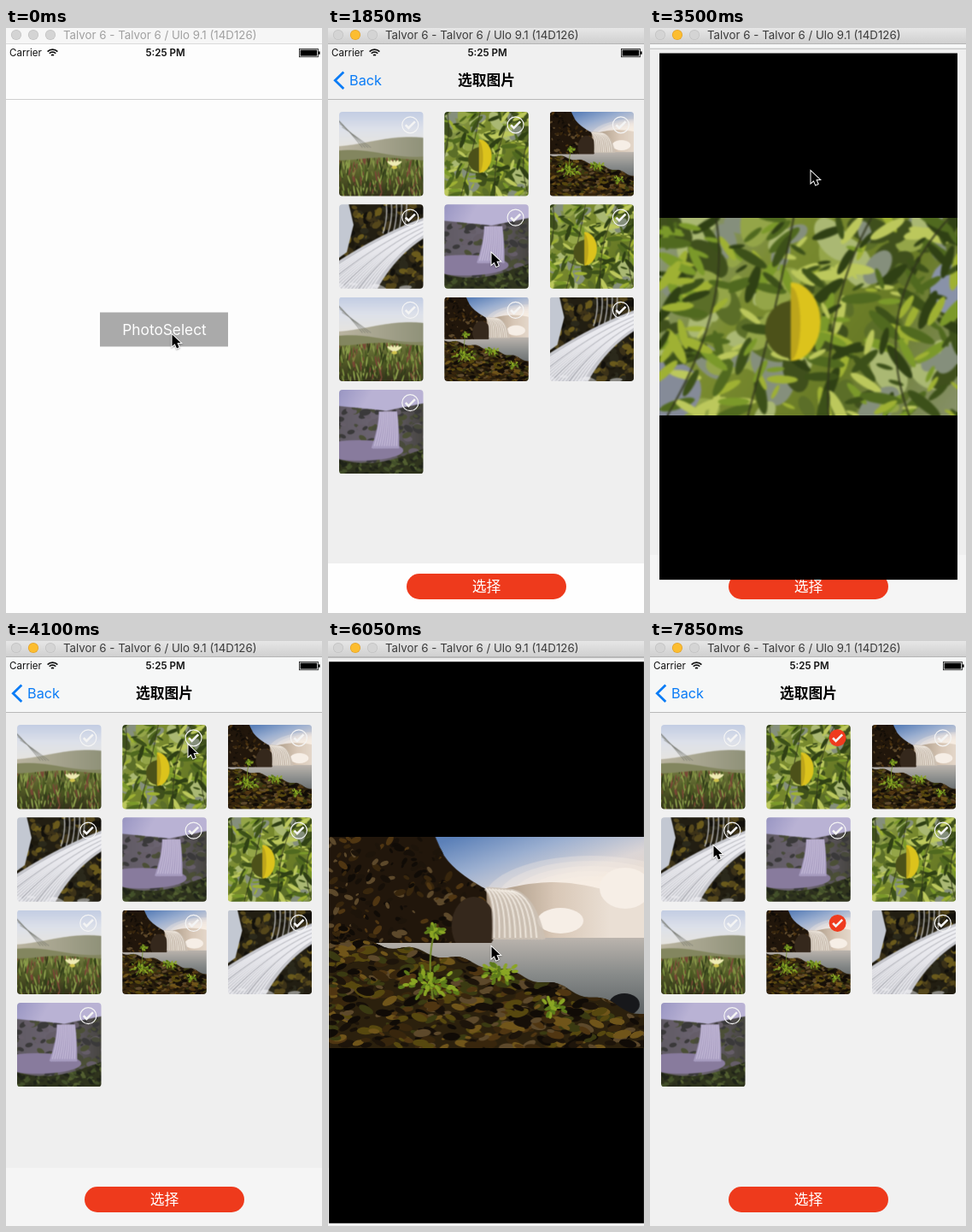
Write an HTML page with a canvas that moves like this. It is 370x684 px and loops after 8000 ms.

```html
<!DOCTYPE html>
<html lang="zh-Hans">
<head>
<meta charset="utf-8">
<title>Photo picker</title>
<style>
html, body { margin: 0; width: 100%; height: 100%; overflow: hidden; background: #fdfdfd; }
canvas { display: block; width: 370px; height: 684px; }
</style>
</head>
<body>
<canvas id="stage" width="370" height="684"></canvas>
<script>
const W = 370, H = 684, LOOP = 8000, STEP = 150, PW = 370, PH = 247, CELL = 98.5;
const ctx = document.getElementById('stage').getContext('2d');
ctx.imageSmoothingQuality = 'high';
const LATIN = 'Inter, "Liberation Sans", sans-serif';
const CJK = '"Noto Sans CJK SC", "Noto Sans CJK", sans-serif';

// ---------- helpers ----------
const clamp = v => Math.min(1, Math.max(0, v));
const mix = (a, b, p) => a + (b - a) * p;
const ease = v => { const u = clamp(v); return u * u * (3 - 2 * u); };
const easeOut = v => 1 - (1 - clamp(v)) ** 3;

function rng(seed) {
  return () => (seed = (seed * 16807) % 2147483647) / 2147483647;
}

function trace(g, pts) {
  g.beginPath();
  for (let i = 0; i < pts.length; i += 2) g.lineTo(pts[i], pts[i + 1]);
}

function oval(g, color, x, y, rx, ry, turn = 0, from = 0, to = 7) {
  g.fillStyle = color;
  g.beginPath();
  g.ellipse(x, y, rx, ry, turn, from, to);
  g.fill();
}

function fade(g, x0, y0, x1, y1, ...colors) {
  const f = g.createLinearGradient(x0, y0, x1, y1);
  colors.forEach((c, i) => f.addColorStop(i / (colors.length - 1), c));
  return f;
}

function text(str, x, y, font, color, align = 'left') {
  ctx.font = font;
  ctx.fillStyle = color;
  ctx.textAlign = align;
  ctx.fillText(str, x, y);
}

function box(color, x, y, w, h) {
  ctx.fillStyle = color;
  ctx.fillRect(x, y, w, h);
}

function pill(color, x, y, w, h, r) {
  ctx.fillStyle = color;
  ctx.beginPath();
  ctx.roundRect(x, y, w, h, r);
  ctx.fill();
}

// ---------- pictures ----------
function picture(seed, blur, paint) {
  const [sharp, soft] = [0, 1].map(() => {
    const c = document.createElement('canvas');
    c.width = PW;
    c.height = PH;
    return c;
  });
  paint(sharp.getContext('2d'), rng(seed));
  const g = soft.getContext('2d');
  g.drawImage(sharp, 0, 0);
  g.filter = `blur(${blur}px)`;
  g.drawImage(sharp, 0, 0);
  return soft;
}

function backdrop(g, fill) {
  g.fillStyle = fill;
  g.fillRect(0, 0, PW, PH);
}

// Fills everything below a skyline and leaves it as the clip for its texture.
function land(g, fill, skyline, texture) {
  g.save();
  g.beginPath();
  g.moveTo(0, PH);
  for (let x = 0; x <= PW; x += 5) g.lineTo(x, skyline(x));
  g.lineTo(PW, PH);
  g.fillStyle = fill;
  g.fill();
  g.clip();
  if (texture) texture();
  g.restore();
}

function specks(g, rnd, n, top, colors, rx, ry, turn) {
  for (let i = 0; i < n; i++) {
    const s = 0.4 + rnd();
    oval(g, colors[i % colors.length], rnd() * PW, mix(top, PH, rnd()), rx * s, ry * s, (rnd() - 0.5) * turn);
  }
}

function tuft(g, rnd, x, y, r, n) {
  for (let i = 0; i < n; i++) {
    const a = rnd() * 7, d = r * rnd();
    oval(g, i % 2 ? '#8aa524' : '#5c7a1a', x + d * Math.cos(a), y + d * 0.6 * Math.sin(a), 4, 2, a);
  }
}

function strands(g, n, color, width, curve) {
  g.strokeStyle = color;
  g.lineWidth = width;
  for (let i = 0; i < n; i++) {
    const [x0, y0, cx, cy, x1, y1] = curve(i / (n - 1));
    g.beginPath();
    g.moveTo(x0, y0);
    g.quadraticCurveTo(cx, cy, x1, y1);
    g.stroke();
  }
}

const meadow = picture(11, 0.8, (g, rnd) => {
  backdrop(g, fade(g, 0, 0, 0, 100, '#c3cde3', '#dde1ea', '#e6e4e0'));
  land(g, fade(g, 0, 0, PW, 0, '#c4bca9', '#a5a38d', '#85896f'), x => 88 - 14 * Math.sin(x / 75 - 2));
  land(g, '#83865f', x => 122 - 10 * Math.sin(x / 60));
  land(g, fade(g, 0, 130, 0, PH, '#747a40', '#525a26', '#33301a'), x => 138 + 4 * Math.sin(x / 40),
    () => specks(g, rnd, 420, 130, ['#7f9440', '#46561f', '#7a4636', '#303c18', '#8fa24d'], 1.8, 12, 0.7));
  strands(g, 4, '#70726a', 1.3, u => [50 + u * 20, 15 + u * 30, 95, 60, 130 + u * 25, 105]);
  for (let i = -2; i <= 2; i++) oval(g, '#efecb4', 224 + i * 5, 154 - Math.abs(i), 4, 13, i * 0.5);
  oval(g, '#d2c44e', 224, 163, 8, 5);
});

const foliage = picture(29, 0.9, (g, rnd) => {
  backdrop(g, fade(g, 0, 0, PW, PH, '#8b9683', '#7b8c30', '#687a26', '#87916a'));
  specks(g, rnd, 90, 0, ['#5b6e28', '#94a548', '#aab873', '#3f4f1c', '#858f7c'], 26, 15, 3);
  oval(g, '#858b98', 12, 215, 40, 36);
  oval(g, '#8992a8', 358, 88, 22, 32);
  specks(g, rnd, 230, 0, ['#9fb133', '#50691f', '#bcc85c', '#2f4014', '#7b992a', '#3c5019'], 19, 5, 2.8);
  strands(g, 4, '#30351b', 2, u => [70 + u * 290, 0, 90 + u * 170, 110, 10 + u * 300, PH]);
  oval(g, '#4c5119', 165, 140, 34, 36, 0, Math.PI / 2, Math.PI * 1.5);
  oval(g, '#dcc31c', 163, 130, 37, 49, 0, -Math.PI / 2, Math.PI / 2);
  oval(g, '#bda51b', 163, 132, 12, 46, 0, -Math.PI / 2, Math.PI / 2);
});

const river = picture(43, 0.7, (g, rnd) => {
  backdrop(g, fade(g, 150, 0, 190, 120, '#5b80b8', '#9bafd0', '#dcd6d6', '#e6d5c6'));
  for (let i = 0; i < 6; i++) oval(g, 'rgba(248,238,228,.3)', 308, 72, 125 - i * 15, 50 - i * 6);
  land(g, fade(g, 200, 0, 330, 0, '#aa9884', '#d8c7b6', '#eadfd4'), x => 62 - 9 * Math.sin((x - 200) / 40));
  oval(g, '#f6eee6', 348, 60, 30, 24);
  oval(g, '#f6eee6', 272, 98, 27, 15);
  land(g, fade(g, 0, 116, 0, 205, '#bdb6af', '#888b8a', '#5f6466'), () => 118);
  const rocks = ['#100b06', '#38260d', '#1d140a', '#503612', '#160f08', '#5d492b'];
  const cliff = x => x < 128 ? 0 : x < 186 ? 62 * Math.sqrt((x - 128) / 58) : PH;
  g.save();
  g.beginPath();
  g.rect(0, 0, 196, 124);
  g.clip();
  land(g, '#21160b', cliff, () => specks(g, rnd, 800, 0, rocks, 5, 2.6, 2.5));
  oval(g, '#35281c', 170, 104, 26, 34);
  g.restore();
  strands(g, 16, 'rgba(205,194,182,.8)', 5, u => [184 + u * 30, 60 + u * 3, 196 + u * 45, 68, 194 + u * 58, 120]);
  strands(g, 9, 'rgba(250,244,236,.7)', 2, u => [184 + u * 30, 60 + u * 3, 196 + u * 45, 68, 194 + u * 50, 118]);
  oval(g, '#17181b', 347, 196, 18, 13);
  land(g, '#2b200d', x => 120 + 88 * (x / PW) ** 1.5 + 3 * Math.sin(x / 9),
    () => specks(g, rnd, 800, 115, [...rocks, '#57480f', '#70551a', '#3a3a12'], 8, 3.6, 1.2));
  strands(g, 1, '#6f8727', 2, () => [124, 112, 115, 140, 122, 190]);
  tuft(g, rnd, 122, 110, 13, 24);
  tuft(g, rnd, 118, 172, 36, 60);
  tuft(g, rnd, 202, 158, 24, 36);
  tuft(g, rnd, 262, 199, 17, 26);
});

const rapids = picture(71, 1, (g, rnd) => {
  backdrop(g, '#221e12');
  specks(g, rnd, 420, 0, ['#3c3218', '#12100b', '#55471b', '#2b291b', '#1c180d', '#6a5a1c'], 11, 7, 3);
  g.fillStyle = '#c3c8d2';
  trace(g, [0, 0, 90, 0, 104, 60, 84, 140, 0, 200]);
  g.fill();
  strands(g, 5, 'rgba(205,205,208,.7)', 4, u => [200 + u * 60, 0, 205 + u * 55, 40, 190 + u * 60, 85]);
  const flow = u => [370, 25 + u * 35, 175 + u * 55, 85 + u * 35, -30 + u * 190, 235 + u * 25];
  strands(g, 16, '#c3c4ca', 13, flow);
  strands(g, 20, 'rgba(244,244,248,.75)', 4, flow);
  strands(g, 5, 'rgba(110,112,122,.5)', 2, flow);
  specks(g, rnd, 12, 225, ['rgba(240,240,244,.5)'], 16, 5, 1);
});

const cascade = picture(97, 1, (g, rnd) => {
  backdrop(g, fade(g, 0, 0, 120, 70, '#8280aa', '#9f9bc6', '#b9b2d4'));
  const ridge = x => x < 200 ? 42 + x * 0.1 : 62 - (x - 200) * 0.2;
  land(g, fade(g, 0, 0, PW, 0, '#5a565c', '#6c6472', '#343528'), ridge,
    () => specks(g, rnd, 260, 40, ['#484a3b', '#655d68', '#4b4f36', '#3a393a'], 12, 7, 1.5));
  oval(g, '#887b9d', 120, 178, 130, 30);
  strands(g, 14, '#a79cc0', 8, u => [182 + u * 46, 64, 182 + u * 52, 110, 160 + u * 74, 172]);
  strands(g, 10, 'rgba(218,211,234,.6)', 3, u => [182 + u * 46, 64, 182 + u * 52, 110, 165 + u * 65, 165]);
  land(g, '#2f341d', x => 183 + 32 * Math.sin(x / 90),
    () => specks(g, rnd, 320, 140, ['#43502a', '#1f2318', '#535f31', '#292c1d'], 8, 4, 2));
});

const PHOTOS = [meadow, foliage, river, rapids, cascade, foliage, meadow, river, rapids, cascade];
const cell = i => [13 + (i % 3) * 123.3, 98 + Math.floor(i / 3) * 108.3];

// ---------- timeline ----------
const PUSH = 490, LOAD = 1550, ZOOM = 300;
const VISITS = [
  { photo: 1, open: 2450, close: 3450, pick: 4250 },
  { photo: 7, open: 5400, close: 6045, pick: 6800 }
];
const MOVES = [
  { at: 1600, dur: 500, x: 188, y: 167 },
  { at: 3700, dur: 400, x: 213, y: 121 },
  { at: 4550, dur: 750, x: 191, y: 357 },
  { at: 6350, dur: 350, x: 219, y: 326 },
  { at: 7100, dur: 700, x: 74, y: 239 }
];
const zoomOf = (v, t) => ease((t - v.open) / ZOOM) - ease((t - v.close) / ZOOM);

// ---------- interface ----------
function titleBar(active) {
  box(active ? fade(ctx, 0, 0, 0, 18, '#e6e6e6', '#d0d0d0') : '#f6f6f6', 0, 0, W, 18);
  box(active ? '#b5b5b5' : '#dadada', 0, 18, W, 1);
  for (let i = 0; i < 3; i++) {
    const amber = active && i === 1;
    oval(ctx, amber ? '#e2a22b' : '#c2c2c2', 12 + i * 20, 8, 6.1, 6.1);
    oval(ctx, amber ? '#fcbd30' : '#d4d4d4', 12 + i * 20, 8, 5.3, 5.3);
  }
  text('Talvor 6 - Talvor 6 / Ulo 9.1 (14D126)', 67, 13, '13.3px ' + LATIN, active ? '#3b3b3b' : '#a0a0a0');
}

function statusBar() {
  text('Carrier', 4, 33.3, '11.6px ' + LATIN, '#111');
  text('5:25 PM', 186.5, 33.3, '600 11.6px ' + LATIN, '#111', 'center');
  ctx.strokeStyle = '#111';
  ctx.lineWidth = 1.7;
  for (const r of [8.3, 5.3, 2]) {
    ctx.beginPath();
    ctx.arc(54.5, 33.5, r, -Math.PI * 0.75, -Math.PI * 0.25);
    ctx.stroke();
  }
  ctx.lineWidth = 0.8;
  ctx.strokeRect(343.4, 24.4, 22, 9.4);
  box('#000', 344.6, 25.6, 19.6, 7);
  box('#000', 366, 27.4, 1.6, 3.4);
}

function navBar(t, push, lift) {
  ctx.save();
  ctx.translate(0, -lift);
  box(push < 0.5 ? '#fdfdfd' : t < VISITS[0].open ? '#f0f0f0' : '#f6f7f7', 0, 19, W, 64);
  box(push < 0.5 ? '#cfcfcf' : '#b9b9b9', 0, 83, W, 1);
  ctx.globalAlpha = push;
  ctx.strokeStyle = '#0b7cf6';
  ctx.lineWidth = 2.8;
  trace(ctx, [18.3, 51.5, 8.3, 61.3, 18.3, 71]);
  ctx.stroke();
  text('Back', mix(105, 25, push), 67, '16.3px ' + LATIN, '#0b7cf6');
  text('选取图片', mix(335, 185.5, push), 67.3, 'bold 16.8px ' + CJK, '#000', 'center');
  ctx.restore();
}

function badge(x, y, on) {
  ctx.lineWidth = 1.2;
  ctx.strokeStyle = '#f4f4f4';
  if (on) {
    oval(ctx, '#ef3b1e', x, y, 10, 10);
  } else {
    ctx.beginPath();
    ctx.arc(x, y, 9.5, 0, 7);
    ctx.stroke();
  }
  ctx.lineWidth = 2.6;
  trace(ctx, [x - 5.5, y, x - 2, y + 3.6, x + 5.6, y - 4]);
  ctx.stroke();
}

function grid(t) {
  PHOTOS.forEach((photo, i) => {
    const [x, y] = cell(i);
    ctx.save();
    ctx.beginPath();
    ctx.roundRect(x, y, CELL, CELL, 4);
    ctx.clip();
    ctx.drawImage(photo, (PW - PH) / 2, 0, PH, PH, x, y, CELL, CELL);
    ctx.restore();
    badge(x + 83.3, y + 15.3, VISITS.some(v => v.photo === i && t >= v.pick));
  });
}

function homeView(x) {
  box('#fdfdfd', x, 84, W, 600);
  box('#aaa', x + 110, 332.5, 150, 40);
  text('PhotoSelect', x + 185.5, 359.2, '17.3px ' + LATIN, '#fff', 'center');
}

function pickerView(t, x) {
  ctx.save();
  ctx.translate(x, 0);
  box(t < 6950 ? '#efefef' : '#f1f1f1', 0, 19, W, 665);
  if (t < 2750) box('#fefefe', 0, 626, W, 58);
  else if (t < 6950) box('#f5f5f5', 0, 616, W, 68);
  pill('#ee3a1c', 92, 638, 187, 30, 15);
  text('选择', 185.5, 659.2, '500 16.8px ' + CJK, '#fff', 'center');
  if (t >= LOAD) grid(t);
  ctx.restore();
}

function viewer(i, p) {
  const [x, y] = cell(i);
  const left = mix(x, 1, p), top = mix(y, 24, p);
  const w = mix(CELL, 369, p), h = mix(CELL, 657, p), ph = mix(34, PH, p);
  box('#000', left, top, w, h);
  ctx.drawImage(PHOTOS[i], left, top + (h - ph) / 2, w, ph);
}

function pointer(t) {
  let x = 194, y = 358;
  for (const m of MOVES) {
    const p = ease((t - m.at) / m.dur);
    x = mix(x, m.x, p);
    y = mix(y, m.y, p);
  }
  ctx.save();
  ctx.translate(x, y);
  ctx.shadowColor = 'rgba(0,0,0,.35)';
  ctx.shadowBlur = 2;
  ctx.shadowOffsetY = 1;
  trace(ctx, [0.5, 0.5, 0.5, 14, 3.7, 11.2, 6, 16.4, 8.6, 15.3, 6.4, 10.2, 10.6, 10]);
  ctx.closePath();
  ctx.lineWidth = 2;
  ctx.strokeStyle = '#fff';
  ctx.stroke();
  ctx.shadowColor = 'transparent';
  ctx.fillStyle = '#000';
  ctx.fill();
  ctx.restore();
}

function draw(t) {
  const push = easeOut((t - PUSH) / 440);
  const visit = VISITS.find(v => zoomOf(v, t) > 0);
  const zoom = visit ? zoomOf(visit, t) : 0;
  box('#fdfdfd', 0, 0, W, H);
  ctx.save();
  ctx.beginPath();
  ctx.rect(0, 19, W, H - 19);
  ctx.clip();
  if (push < 1) homeView(-111 * push);
  if (push > 0) pickerView(t, W * (1 - push));
  navBar(t, push, 64 * zoom);
  if (zoom < 0.9) statusBar();
  if (visit) viewer(visit.photo, zoom);
  ctx.restore();
  titleBar(t >= PUSH);
  pointer(t);
}

const start = performance.now();
function tick() {
  const t = (performance.now() - start) % LOOP;
  draw(t < 500 ? 0 : 500 + Math.floor((t - 500) / STEP) * STEP);
  requestAnimationFrame(tick);
}
tick();
</script>
</body>
</html>
```
